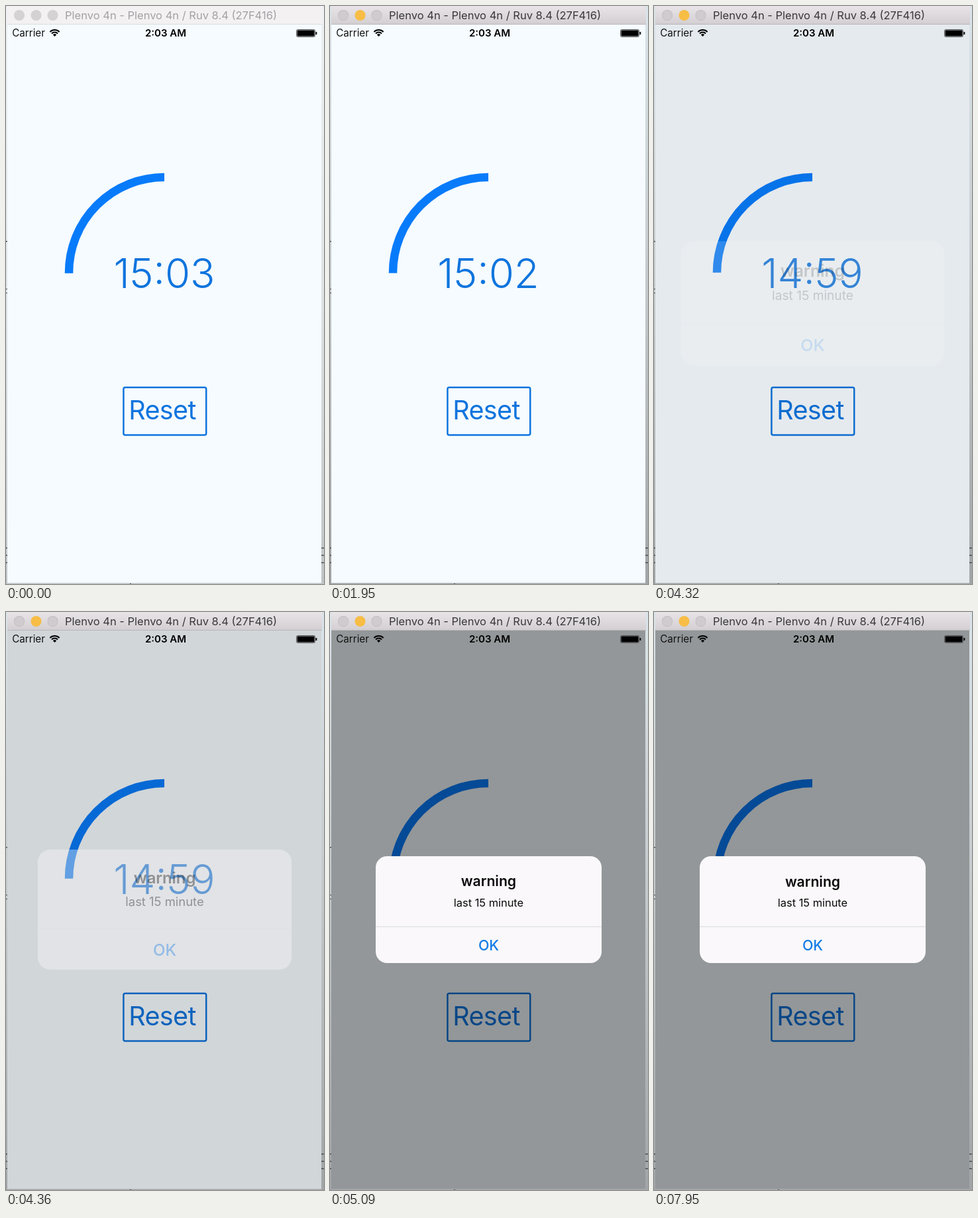
An HTML page with a canvas for the animation above (8000 ms loop, 480x871 px).

```html
<!DOCTYPE html>
<html lang="en">
<head>
<meta charset="utf-8">
<title>Countdown</title>
<style>
  html, body { margin: 0; width: 100%; height: 100%; overflow: hidden; background: #f5fbff; }
  canvas { display: block; width: 100vw; height: 100vh; }
</style>
</head>
<body>
<canvas id="stage"></canvas>
<script>
const W = 480, H = 871, LOOP = 8000;
const ACTIVATE = 400;      // window gains focus
const FIRST_TICK = 1240;   // 15:03 becomes 15:02, then one tick per second
const ALERT = 4270;
const BLUE = '#0e74de';
const FONT = 'Inter, Roboto, sans-serif';

const canvas = document.getElementById('stage');
const ctx = canvas.getContext('2d');
const dpr = window.devicePixelRatio || 1;
canvas.width = W * dpr;
canvas.height = H * dpr;

function rect(x, y, w, h, fill) {
  ctx.fillStyle = fill;
  ctx.fillRect(x, y, w, h);
}

function roundRect(x, y, w, h, r) {
  ctx.beginPath();
  ctx.roundRect(x, y, w, h, r);
}

function disc(x, y, r, fill) {
  ctx.beginPath();
  ctx.arc(x, y, r, 0, Math.PI * 2);
  ctx.fillStyle = fill;
  ctx.fill();
}

function text(str, x, y, size, color, { weight = 400, align = 'center', spacing = 0 } = {}) {
  ctx.font = `${weight} ${size}px ${FONT}`;
  ctx.letterSpacing = spacing + 'px';
  ctx.textAlign = align;
  ctx.fillStyle = color;
  ctx.fillText(str, x, y);
}

function vertical(y0, y1, ...colors) {
  const g = ctx.createLinearGradient(0, y0, 0, y1);
  colors.forEach((c, i) => g.addColorStop(i / (colors.length - 1), c));
  return g;
}

// Critically damped spring from 0 to 1.
function spring(ms) {
  if (ms <= 0) return 0;
  const k = ms * 0.0144;
  return 1 - (1 + k) * Math.exp(-k);
}

function drawDesktop(active) {
  rect(0, 0, W, H, active
    ? vertical(0, H, '#dae4e9', '#c3c8cb', '#a2a5a8')
    : vertical(0, H, '#eef1f3', '#dfe3e6', '#c0c4c7'));
  const ink = '#4c5056';
  rect(0, 354, 3, 1.5, ink);
  rect(0, 426, 2, 1, ink);
  rect(0, 432, 2, 1, ink);
  for (const y of [816, 827, 838]) {
    rect(0, y, 2.5, 1.5, ink);
    rect(476, y, 4, 1.5, ink);
  }
}

function drawTitleBar(active) {
  rect(2, 0, 475, 28, active ? vertical(0, 28, '#e8e4e8', '#d2ced1') : '#f4f1f3');
  rect(2, 27, 475, 1, active ? '#b9b6b9' : '#dcdadc');
  for (const x of [20, 45.5, 70.5]) {
    if (active && x === 45.5) {
      disc(x, 14, 8, '#f7bd45');
    } else {
      disc(x, 14, 8, active ? '#bdb9bc' : '#d3d0d2');
      disc(x, 14, 7.3, active ? '#cfcbce' : '#d5d2d4');
    }
  }
  text('Plenvo 4n - Plenvo 4n / Ruv 8.4 (27F416)', 249, 20, 16.5, active ? '#3a383a' : '#a3a1a3');
}

function drawWifi() {
  const x = 73.5, y = 46, a = Math.PI / 4;
  ctx.strokeStyle = '#000';
  ctx.lineWidth = 2;
  for (const r of [10, 6.4]) {
    ctx.beginPath();
    ctx.arc(x, y, r, -Math.PI / 2 - a, -Math.PI / 2 + a);
    ctx.stroke();
  }
  ctx.beginPath();
  ctx.moveTo(x, y);
  ctx.arc(x, y, 3.8, -Math.PI / 2 - a, -Math.PI / 2 + a);
  ctx.fillStyle = '#000';
  ctx.fill();
}

function drawBattery() {
  roundRect(438.5, 35.5, 28, 11, 2);
  ctx.strokeStyle = '#55585a';
  ctx.lineWidth = 1;
  ctx.stroke();
  rect(439.5, 36.5, 26, 9, '#000');
  rect(467.5, 39, 1.8, 4, '#000');
}

function drawStatusBar() {
  text('Carrier', 9.2, 46, 15.2, '#111', { align: 'left' });
  text('2:03 AM', 241, 46, 15, '#000', { weight: 600 });
  drawWifi();
  drawBattery();
}

function drawTimer(left) {
  const top = -Math.PI / 2;
  ctx.beginPath();
  ctx.arc(239, 402, 144, top, top - left / 3600 * Math.PI * 2, true);
  ctx.strokeStyle = '#087bfa';
  ctx.lineWidth = 12.5;
  ctx.stroke();

  const pad = n => String(n).padStart(2, '0');
  const label = pad(Math.floor(left / 60)) + ':' + pad(left % 60);
  text(label, 239, 424.5, 61.7, BLUE, { weight: 300 });
}

function drawReset() {
  roundRect(177.4, 574.7, 124.8, 71.8, 2.5);
  ctx.strokeStyle = BLUE;
  ctx.lineWidth = 2.5;
  ctx.stroke();
  text('Reset', 236, 622.5, 39.5, BLUE, { spacing: -0.6 });
}

function drawAlert(p) {
  const cx = 239.5, cy = 448.5, scale = 1.2 - 0.2 * p;
  ctx.save();
  ctx.globalAlpha = p;
  ctx.translate(cx, cy);
  ctx.scale(scale, scale);
  ctx.translate(-cx, -cy);
  roundRect(69, 368, 341, 161, 17);
  ctx.fillStyle = '#faf8fa';
  ctx.fill();
  rect(69, 473.7, 341, 1, '#d6d7da');
  text('warning', cx, 413.5, 21.2, '#0a0a0a', { weight: 600 });
  text('last 15 minute', cx, 444, 16.4, '#0a0a0a');
  text('OK', cx, 510, 21.4, '#127be6', { weight: 500 });
  ctx.restore();
}

function draw(t) {
  const active = t >= ACTIVATE;
  const ticks = Math.max(0, Math.floor((t - FIRST_TICK) / 1000) + 1);
  const shown = spring(t - ALERT);

  ctx.setTransform(canvas.width / W, 0, 0, canvas.height / H, 0, 0);
  drawDesktop(active);
  rect(2, 28, 474, 841.5, '#f5fbff');
  drawTimer(903 - ticks);
  drawReset();
  rect(2, 28, 474, 841.5, `rgba(0, 0, 0, ${0.4 * shown})`);
  drawStatusBar();
  drawTitleBar(active);
  rect(187, 870, 2, 1, '#555');
  if (shown > 0) drawAlert(shown);
}

const start = performance.now();
function frame() {
  draw((performance.now() - start) % LOOP);
  requestAnimationFrame(frame);
}
frame();
</script>
</body>
</html>
```
